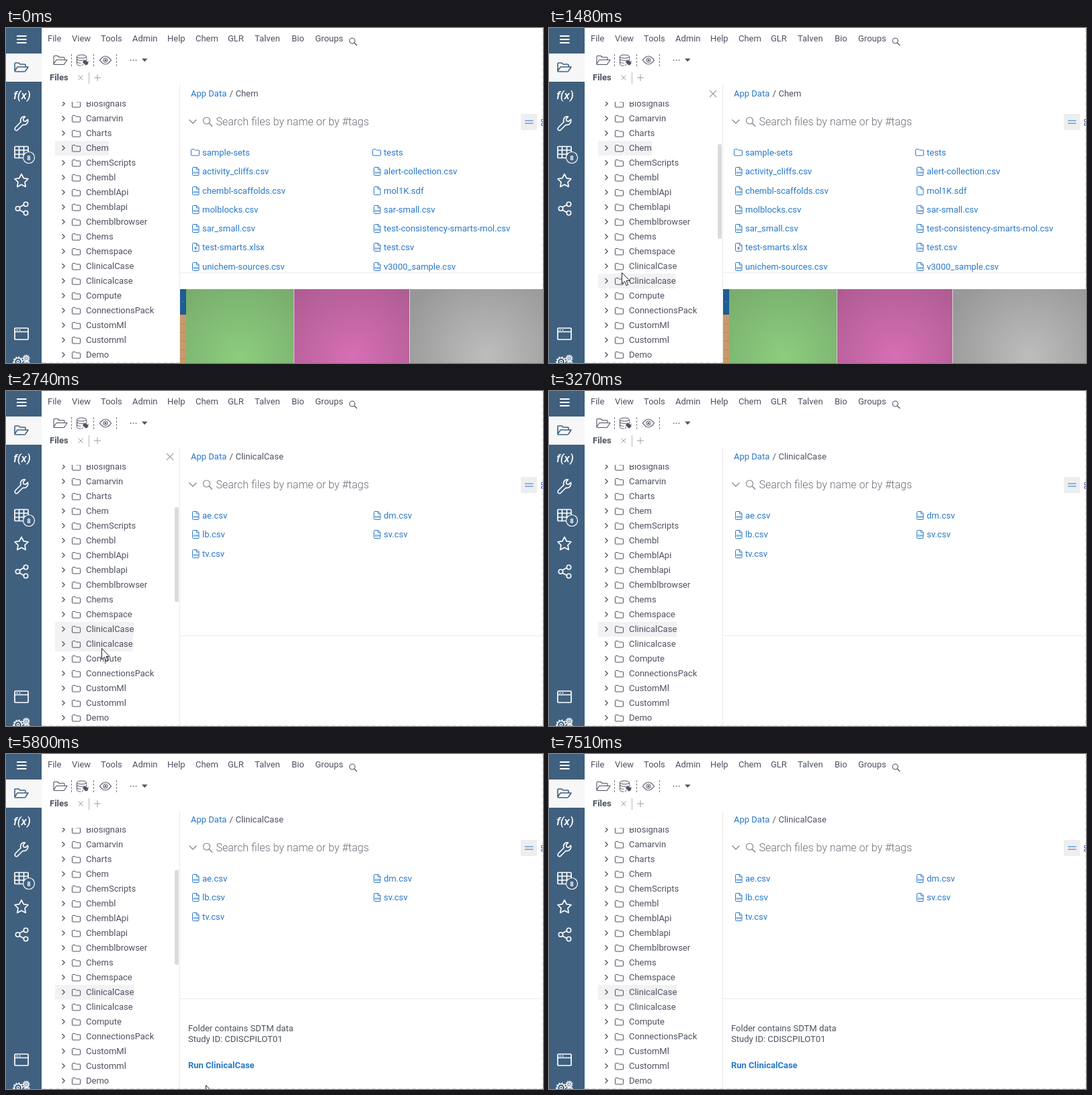
An HTML page with a canvas that plays this animation: 799x499 px, repeating every 8 s.

```html
<!DOCTYPE html>
<html lang="en">
<head>
<meta charset="utf-8">
<title>File browser</title>
<style>
html, body { margin: 0; width: 100%; height: 100%; overflow: hidden; background: #fff; }
canvas { display: block; }
</style>
</head>
<body>
<canvas id="stage" width="799" height="499"></canvas>
<script>
const ctx = document.getElementById('stage').getContext('2d');
const LOOP = 8000;
const INK = '#4d5261', LINK = '#2878c8', NAVY = '#40607f', PALE = '#f2f2f4', GREY = '#9a9da6';

const menu = [['File', 62], ['View', 98], ['Tools', 141], ['Admin', 188], ['Help', 240], ['Chem', 282],
  ['GLR', 330], ['Talven', 370], ['Bio', 425], ['Groups', 460]];
const folders = ['Biosignals', 'Camarvin', 'Charts', 'Chem', 'ChemScripts', 'Chembl', 'ChemblApi', 'Chemblapi',
  'Chemblbrowser', 'Chems', 'Chemspace', 'ClinicalCase', 'Clinicalcase', 'Compute', 'ConnectionsPack',
  'CustomMl', 'Customml', 'Demo'];
const files = {
  Chem: ['sample-sets', 'tests', 'activity_cliffs.csv', 'alert-collection.csv', 'chembl-scaffolds.csv', 'mol1K.sdf',
    'molblocks.csv', 'sar-small.csv', 'sar_small.csv', 'test-consistency-smarts-mol.csv', 'test-smarts.xlsx',
    'test.csv', 'unichem-sources.csv', 'v3000_sample.csv'],
  ClinicalCase: ['ae.csv', 'dm.csv', 'lb.csv', 'sv.csv', 'tv.csv']
};

// Pointer positions [time, x, y]; no position means hidden.
const pointerSteps = [[0],
  [1060, 84, 450], [1130, 86, 424], [1200, 90, 404], [1270, 94, 390], [1340, 98, 380],
  [1410, 103, 371], [1480, 108, 364], [1550, 116, 361], [1610, 124, 359], [1680, 130, 359],
  [2680, 131, 360], [2740, 142, 383], [2800, 160, 423], [2870, 182, 476], [2940],
  [5800, 297, 493], [5860, 299, 485], [5930, 301, 479], [6000, 304, 475], [6090, 306, 473],
  [6230, 311, 469], [6300, 317, 464], [6370, 320, 462], [7250, 319, 466], [7310, 315, 475], [7380]];

const within = (t, ...spans) => spans.some(([from, to]) => t >= from && t < to);

function rect(x, y, w, h, fill) {
  ctx.fillStyle = fill;
  ctx.fillRect(x, y, w, h);
}

function text(string, x, y, color = INK, style = '400 13px') {
  ctx.font = style + ' Roboto, sans-serif';
  ctx.fillStyle = color;
  ctx.fillText(string, x, y);
}

function draw(d, stroke, width = 1, x = 0, y = 0, fill) {
  const path = new Path2D(d);
  ctx.save();
  ctx.translate(x, y);
  if (fill) { ctx.fillStyle = fill; ctx.fill(path); }
  if (stroke) { ctx.strokeStyle = stroke; ctx.lineWidth = width; ctx.stroke(path); }
  ctx.restore();
}

function circle(x, y, r, stroke, width, fill) {
  draw(`M${-r} 0a${r} ${r} 0 1 0 ${2 * r} 0a${r} ${r} 0 1 0 ${-2 * r} 0z`, stroke, width, x, y, fill);
}

function dashed(d, color, pattern) {
  ctx.setLineDash(pattern);
  draw(d, color);
  ctx.setLineDash([]);
}

const openFolder = (x, y, color, width) =>
  draw('M1 13V2q0-1 1-1h5l2 2h7q1 0 1 1v3M1 13l4-6h16l-4 6q-.5 1-1.500 1H2q-1 0-1-1z', color, width, x, y);
const closedFolder = (x, y, color) =>
  draw('M.5 1.500q0-1 1-1h3.500l1.500 1.500h5q1 0 1 1v6q0 1-1 1h-10q-1 0-1-1z', color, 1, x, y);

function fileIcon(x, y, name) {
  const type = name.split('.')[1];
  draw('M.5 1.500q0-1 1-1H7l3 3v8q0 1-1 1H1.500q-1 0-1-1zM6.500.5V4H10', LINK, 1, x, y);
  if (type === 'csv') text('csv', x + 1.7, y + 9.5, LINK, '700 5px');
  if (type === 'xlsx') text('x', x + 3, y + 10, '#6a5fc0', '700 8px');
}

function sidebar() {
  rect(0, 0, 53, 499, NAVY);
  rect(0, 38, 53, 42, '#f7f7f8');
  draw('M16 12h14.500M16 17h14.500M16 22h14.500', '#fff', 1.8);
  openFolder(12, 51, NAVY, 1.6);
  text('f(x)', 11, 106, '#fff', 'italic 500 17px');
  // wrench
  draw('M14 148l8-8q-1.500-5 2.500-7.500 2-1 4-.5l-3 3.500 .7 3 3 .7 3.300-3q1 5-3 7.500-2 1-4.500.5l-8 8q-2 1-3.500-.5-1-1.700.5-3.700z', '#fff', 1.6);
  draw('M14 176.500h18q1 0 1 1v15q0 1-1 1H14q-1 0-1-1v-15q0-1 1-1zM13 182h20M13 188h20M19.500 177v16M26.500 177v16', '#fff', 1.7);
  circle(34, 193, 8.5, '#fff', 1.2, NAVY);
  text('8', 31.3, 196.5, '#fff', '700 9.5px');
  // star
  let star = '';
  for (let i = 0; i < 10; i++) {
    const a = (i / 5 - 0.5) * Math.PI, r = i % 2 ? 5.3 : 10.5;
    star += (i ? 'L' : 'M') + r * Math.cos(a) + ' ' + r * Math.sin(a);
  }
  ctx.lineJoin = 'round';
  draw(star + 'z', '#fff', 1.7, 23, 228);
  // share
  draw('M20 267l7-4M20 271l7 4', '#fff', 1.6);
  for (const [x, y] of [[17.5, 269], [29.5, 262.5], [29.5, 275.5]]) circle(x, y, 3.2, '#fff', 1.6);
  // window
  draw('M14 447h18q1 0 1 1v15q0 1-1 1H14q-1 0-1-1v-15q0-1 1-1zM13 452.500h20', '#fff', 1.7);
  draw('M15.500 449.800h2M19.500 449.800h2', '#fff', 1.6);
  // gears
  for (const [x, y, r] of [[18, 497, 5.5], [30, 492, 3.3], [31, 500, 3]]) {
    circle(x, y, r, '#fff', 1.5);
    ctx.setLineDash([r / 2.5, r / 2.6]);
    circle(x, y, r + 1.5, '#fff', 1.5);
    ctx.setLineDash([]);
    circle(x, y, r / 3, '#fff', 1.2);
  }
}

function header() {
  for (const [label, x] of menu) text(label, x, 20);
  circle(515.2, 19, 4, INK, 1.1);
  draw('M518.200 22l4 4', INK, 1.2);

  openFolder(70, 40.5, INK, 1.1);
  dashed('M97.500 39v18M130.500 39v18M164.500 39v18', '#777', [3, 2]);
  // database with plug
  draw('M105.500 42.500c0-3.300 14-3.300 14 0s-14 3.300-14 0v11c0 2 3 2.600 6 2.600M105.500 46c0 2.700 9 3 12 1.700M105.500 50c0 1.700 3 2.300 6 2.300M119.500 42.500v3', INK);
  draw('M113 56l2-2M114.500 51l4 4c2 0 3.500-1.500 3.500-3.500l-3-3c-2 0-4 .5-4.500 2.500zM119 48l1.500-2M121.500 50.500l1.500-1.500', INK, 1, 0, 0, INK);
  draw('M139.500 48q8.500-12 17 0-8.500 12-17 0z', INK, 1.2);
  circle(148, 48, 3.2, INK, 1, '#fff');
  circle(148, 48, 1.5, null, 0, INK);
  for (const x of [185.5, 189.5, 193.500]) circle(x, 48, 1, null, 0, '#777a84');
  draw('M202 45.500h8.500l-4.200 4.700z', null, 0, 0, 0, INK);

  text('Files', 65, 78, INK, '700 13px');
  draw('M107.500 70.500l7 7m0-7l-7 7M131 74h10M136 69v10', GREY);
  draw('M123.500 66v17', '#b5b7bd');
}

function tree(current, hovered) {
  ctx.save();
  ctx.beginPath();
  ctx.rect(54, 110, 204, 389);
  ctx.clip();
  folders.forEach((name, i) => {
    const y = 117 + 22 * i;
    ctx.font = '400 13px Roboto, sans-serif';
    if (name === current || i === hovered) rect(73, y - 15, 46 + ctx.measureText(name).width, 22, PALE);
    draw('M83.500 0l3.700 3.700-3.700 3.700', INK, 1.3, 0, y - 8);
    closedFolder(98, y - 9, INK);
    text(name, 119, y);
  });
  ctx.restore();
}

function browser(current) {
  draw('M258.500 85v414', '#e8e8ea');
  draw('M259 364.500h540', '#ececee');
  text('App Data', 275, 102, LINK);
  text('/', 332.5, 102);
  text(current, 341.5, 102);

  draw('M272.500 136.500l5.500 5.500 5.500-5.500', '#7b7e88', 1.1);
  circle(298.5, 138, 5, '#7b7e88', 1.1);
  draw('M302 141.500l5 5', '#7b7e88', 1.2);
  text('Search files by name or by #tags', 312.5, 145, '#6c6f79', '300 16px');
  rect(766, 128, 24, 24, '#eeeef1');
  draw('M772 138h12.500M772 142h12.500', LINK, 1.1);
  draw('M799 136.500h-2.500v3h2.500M799 142h-2.500v3h2.500', '#5a62c0');

  files[current].forEach((name, i) => {
    const x = i % 2 ? 545 : 275;
    const y = Math.round(190.1 + 28.25 * (i >> 1));
    if (name.includes('.')) fileIcon(x + 2, y - 11, name);
    else closedFolder(x, y - 10, LINK);
    text(name, x + 17, y, LINK);
  });
}

function tile(x, w, cx, inner, outer) {
  const glow = ctx.createRadialGradient(cx, 490, 5, cx, 490, 135);
  glow.addColorStop(0, inner);
  glow.addColorStop(1, outer);
  rect(x, 389, w, 110, glow);
}

function previews() {
  rect(259, 389, 9, 38, '#1f5c92');
  rect(262, 407, 2, 1, '#6f9cc4');
  rect(259, 427, 9, 72, '#c99a69');
  for (let y = 440; y < 499; y += 13) rect(259, y, 9, 1, '#b98857');
  tile(268, 160, 348, '#8ccc7d', '#76aa6b');
  tile(429, 171, 516, '#d56eb3', '#ac5b91');
  tile(601, 198, 715, '#bcbcbc', '#989898');
  rect(428, 389, 1, 110, '#d9c4d2');
  rect(600, 389, 1, 110, '#d4d4d4');
}

function study(hover) {
  text('Folder contains SDTM data', 271, 413);
  text('Study ID: CDISCPILOT01', 271, 429);
  text('Run ClinicalCase', 271, 468, hover ? '#185a9c' : LINK, '700 13px');
}

function click(x, y) {
  ctx.globalCompositeOperation = 'multiply';
  circle(x, y, 14.5, null, 0, '#fcf22c');
  ctx.globalCompositeOperation = 'source-over';
}

function render() {
  const t = performance.now() % LOOP;
  const [, px, py] = pointerSteps.findLast(step => step[0] <= t);
  const current = t < 2740 ? 'Chem' : 'ClinicalCase';
  const overTree = within(t, [1060, 2940]);
  const panelActive = within(t, [1060, 3270]);

  rect(0, 0, 799, 499, '#fff');
  dashed('M54 498.500h745M798.500 0v499', '#dedee0', [6, 4]);
  header();
  tree(current, overTree ? Math.floor((py + 3 - 102) / 22) : -1);
  browser(current);
  if (t < 2740) previews();
  if (t >= 4610) study(within(t, [6000, 7310]));
  if (panelActive) draw('M239 93l10 10m0-10l-10 10', GREY, 1.1);
  if (panelActive || within(t, [70, 270], [5800, 6000], [7310, 7510])) {
    ctx.fillStyle = '#dadbde';
    ctx.beginPath();
    ctx.roundRect(251, 173, 6, 141, 2);
    ctx.fill();
  }
  sidebar();
  if (within(t, [2080, 2740])) click(130, 359.5);
  if (within(t, [6910, 7100])) click(320, 462);
  if (px) draw('M.5 .5V17l4-3.700L7 19.500l2.700-1.100L7 12.400h5z', '#222', 1, px, py, '#fff');
  requestAnimationFrame(render);
}
render();
</script>
</body>
</html>
```
